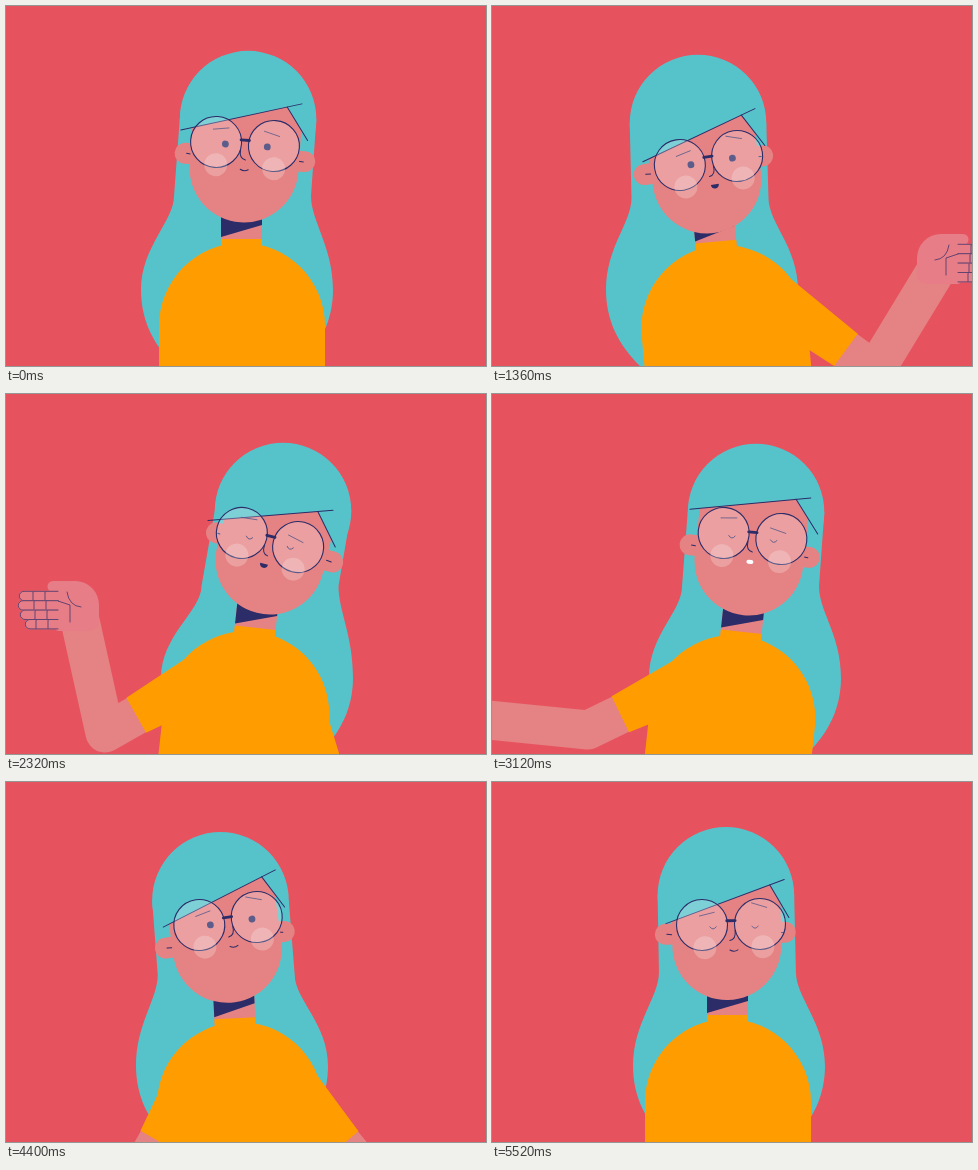
An HTML page with a canvas that plays this animation: 480x360 px, repeating every 5600 ms.

```html
<!DOCTYPE html>
<html lang="en">
<head>
<meta charset="utf-8">
<title>Talking character</title>
<style>
  html, body { margin: 0; width: 100%; height: 100%; overflow: hidden; background: #e6525e; }
  canvas { display: block; width: 480px; height: 360px; }
</style>
</head>
<body>
<canvas id="stage" width="480" height="360"></canvas>
<script>
const ctx = document.getElementById('stage').getContext('2d');
const LOOP = 5600, STEP = 80, RAD = Math.PI / 180;
const BG = '#e6525e', HAIR = '#56c3ca', SKIN = '#e58283', HAND = '#e77d86',
      SHIRT = '#ff9d00', NAVY = '#2b2c68';

// time, x, y, tilt of the glasses; then hair cap x, y and face x, y beside them; fringe; turn
const HEAD = [
  [0, 239, 138, 4, 1.3, -25, .7, 24, -9.5, .6],
  [560, 224, 144, -6, -4, -29, -4, 22, -6, .1],
  [1120, 221, 146, -7, -4.4, -31, -4.4, 21, -7, 0],
  [1360, 216.5, 154.5, -9, -4.5, -38.7, -4.4, 18, -9, 0],
  [1840, 258, 143, 9, 3, -27, 3, 22, -8, .8],
  [2320, 264, 146, 14, 5.6, -31.3, 4.8, 19.4, -4, 1],
  [3120, 260.5, 142, 6, 1, -24.2, -.9, 25.2, -20, .95],
  [3760, 222.5, 138, -8, -4.6, -20.9, -4.4, 27.7, -3, 0],
  [4400, 222, 139, -8, -4.6, -21.5, -4.4, 27, -3, 0],
  [4880, 240.5, 141, 0, -4, -28, -4.5, 22, -2, 0],
  [5520, 239, 142.5, -1, -4.6, -29.3, -4.5, 21, -2, 0]
];
// time, hair tips x, body tilt, body drop
const BODY = [
  [0, 231, 0, 0], [560, 223, -3, 0], [1120, 217, -4, 1], [1360, 210, -5.3, 2],
  [1840, 245, 5, 1], [2320, 251, 6.2, 0], [3120, 253, 6.2, 4], [3760, 232, -3, 3],
  [4400, 226, -3, 3], [4880, 237, 0, 0], [5520, 237, 0, 0]
];
// time, elbow x, y, wrist x, y
const RIGHT = [
  [0, 282, 400, 290, 480], [160, 345, 392, 400, 460], [320, 388, 362, 460, 300],
  [560, 378, 364, 398, 248], [1200, 378, 364, 398, 250], [1360, 383, 365, 445, 263],
  [1520, 372, 385, 460, 420], [1680, 300, 400, 310, 480], [1920, 300, 410, 310, 490],
  [2320, 330, 410, 335, 490], [3120, 305, 410, 310, 490], [3600, 361, 389, 372, 480],
  [4480, 360, 390, 371, 480], [4760, 282, 400, 290, 480]
];
const LEFT = [
  [0, 190, 400, 182, 480], [1600, 190, 400, 182, 480], [1760, 115, 380, 50, 430],
  [1920, 92, 345, 25, 275], [2080, 98, 340, 60, 226], [2320, 99, 339, 73, 222],
  [2880, 99, 338, 72, 222], [3120, 96, 336, -23, 324], [3280, 105, 350, 5, 410],
  [3600, 134, 390, 128, 480], [4480, 134, 390, 128, 480], [4760, 190, 400, 182, 480]
];

// Smooth interpolation through the keys without overshoot
function at(keys, t) {
  let i = 0;
  while (i < keys.length - 2 && t >= keys[i + 1][0]) i++;
  const a = keys[i], b = keys[i + 1], h = b[0] - a[0];
  const s = Math.min(1, (t - a[0]) / h), s2 = s * s, s3 = s2 * s;
  const slope = (k, c) => (keys[k + 1][c] - keys[k][c]) / (keys[k + 1][0] - keys[k][0]);
  const tangent = (k, c) => {
    if (k < 1 || k > keys.length - 2) return 0;
    const p = slope(k - 1, c), q = slope(k, c);
    return p * q <= 0 ? 0 : 2 * p * q / (p + q);
  };
  return a.slice(1).map((v, n) => {
    const c = n + 1;
    return (2 * s3 - 3 * s2 + 1) * v + (3 * s2 - 2 * s3) * b[c] +
      h * ((s3 - 2 * s2 + s) * tangent(i, c) + (s3 - s2) * tangent(i + 1, c));
  });
}

const rot = (x, y, deg) => {
  const c = Math.cos(deg * RAD), s = Math.sin(deg * RAD);
  return [x * c - y * s, x * s + y * c];
};

function path(points) {
  ctx.beginPath();
  points.forEach(p => ctx.lineTo(p[0], p[1]));
}
function poly(color, ...points) {
  path(points);
  ctx.fillStyle = color;
  ctx.fill();
}
function line(color, width, ...points) {
  path(points);
  ctx.strokeStyle = color;
  ctx.lineWidth = width;
  ctx.stroke();
}
function disc(color, x, y, r) {
  ctx.beginPath();
  ctx.arc(x, y, r, 0, 7);
  ctx.fillStyle = color;
  ctx.fill();
}
function curve(width, x0, y0, cx, cy, x1, y1) {
  ctx.beginPath();
  ctx.moveTo(x0, y0);
  ctx.quadraticCurveTo(cx, cy, x1, y1);
  ctx.strokeStyle = NAVY;
  ctx.lineWidth = width;
  ctx.stroke();
}

function drawHair(cx, cy, bx) {
  const px = (cx + bx) / 2, py = 190 + (cy - 113) / 2;
  disc(HAIR, cx, cy, 68.3);
  for (const s of [-1, 1]) {
    ctx.beginPath();
    ctx.moveTo(cx, cy);
    ctx.lineTo(cx + s * 68.3, cy);
    ctx.lineTo(px + s * 68.5, py);
    ctx.bezierCurveTo(px + s * 68.5, py + 25, bx + s * 96, 241, bx + s * 96, 284);
    ctx.bezierCurveTo(bx + s * 96, 315, bx + s * 83, 340, bx + s * 60, 362);
    ctx.lineTo(bx - s * 5, 362);
    ctx.lineTo(px - s * 5, py);
    ctx.fillStyle = HAIR;
    ctx.fill();
  }
}

// Fingers point to the left; side = 1 mirrors them
function drawHand(x, y, side) {
  ctx.save();
  ctx.translate(x, y);
  ctx.scale(-side, 1);
  ctx.beginPath();
  ctx.roundRect(-24, -35, 44, 50, [4, 24, 10, 4]);
  ctx.fillStyle = HAND;
  ctx.fill();
  line(HAND, 11, [-26, -29.5], [-4, -29.5]);
  [-55, -56, -54, -49].forEach((tip, i) => {
    const fy = -20 + i * 9.4;
    line(HAND, 10.5, [tip, fy], [-18, fy]);
    ctx.beginPath();
    ctx.moveTo(-21, fy - 4.7);
    ctx.lineTo(tip, fy - 4.7);
    ctx.arc(tip, fy, 4.7, -Math.PI / 2, Math.PI / 2, true);
    ctx.lineTo(-21, fy + 4.7);
    ctx.strokeStyle = NAVY;
    ctx.lineWidth = .7;
    ctx.stroke();
    for (const k of [-46, -34]) line(NAVY, .7, [k + i, fy - 4], [k + i, fy + 4]);
  });
  line(NAVY, .7, [-21, -15], [-9, -11], [-9, 6]);
  curve(.7, -12, -24, -10, -10, 2, -9);
  ctx.restore();
}

function drawArm([ex, ey, wx, wy], side, tilt, drop) {
  let [sx, sy] = rot(side * 40, -77, tilt);
  sx += 236;
  sy += 360 + drop;
  const len = Math.hypot(ex - sx, ey - sy);
  const dx = (ex - sx) / len, dy = (ey - sy) / len;
  const mx = ex - dx * 36, my = ey - dy * 36;
  line(SKIN, 39, [mx - dx * 4, my - dy * 4], [ex, ey], [wx, wy]);
  drawHand(wx, wy, side);
  poly(SHIRT, [sx - dy * 26, sy + dx * 26], [mx - dy * 20, my + dx * 20],
    [mx + dy * 20, my - dx * 20], [sx + dy * 26, sy - dx * 26]);
}

function withBody(tilt, drop, draw) {
  ctx.save();
  ctx.translate(236, 360 + drop);
  ctx.rotate(tilt * RAD);
  ctx.translate(-236, -360);
  draw();
  ctx.restore();
}
function drawNeck() {
  poly(SKIN, [215, 195], [256, 195], [256, 240], [215, 240]);
  poly(NAVY, [215, 195], [256, 195], [256, 219], [215, 231]);
}
function drawShirt() {
  poly(SHIRT, [215, 233], [256, 233], [256, 260], [215, 260]);
  ctx.beginPath();
  ctx.arc(236, 320, 83, Math.PI, 0);
  ctx.lineTo(319, 400);
  ctx.lineTo(153, 400);
  ctx.fill();
}

function drawMouth(x, kind) {
  if (kind === 0) curve(1, x - 4, 25.5, x, 28, x + 4, 25.5);
  else if (kind === 1) {
    ctx.beginPath();
    ctx.roundRect(x - 3.5, 24, 7, 4, 2);
    ctx.fillStyle = '#fff';
    ctx.fill();
  } else {
    ctx.beginPath();
    ctx.moveTo(x - 4, 24.5);
    ctx.lineTo(x + 4, 24.5);
    ctx.bezierCurveTo(x + 4, 30, x - 4, 30, x - 4, 24.5);
    ctx.fillStyle = NAVY;
    ctx.fill();
  }
}

function drawFace(fx, fy, fringe, u, closed, mouth) {
  const earY = fy * 1.6 - 25;
  for (const s of [-1, 1]) {
    const x = s * 60 + fx * 1.3;
    line(SKIN, 21, [x, earY], [fx + s * 40, earY]);
    line(NAVY, 1, [x - s * 4 - 2.5, earY], [x - s * 4 + 2.5, earY + .5]);
  }

  // Face shows below the fringe only
  const left = [-65, fringe], right = [54, -44];
  const corner = [39.5, fringe + (-44 - fringe) * 104.5 / 119];
  const side = [58 + 7 * u, -6 - 3 * u];
  ctx.save();
  path([left, corner, side, [110, 120], [-110, 120]]);
  ctx.clip();
  ctx.beginPath();
  ctx.arc(fx, fy, 54.5, 0, Math.PI);
  ctx.lineTo(fx - 54.5, -60);
  ctx.lineTo(fx + 54.5, -60);
  ctx.fillStyle = SKIN;
  ctx.fill();
  ctx.restore();
  line(NAVY, 1, left, right);
  line(NAVY, 1, corner, side);

  line(NAVY, .8, [-31.5 - 2 * u, -9 - 6 * u], [-16.5 - u, -12.5 - 4 * u]);
  line(NAVY, .8, [20.8 - 4 * u, -21.3 + 12 * u], [36 - 3.3 * u, -16.5 + 11 * u]);
  for (const s of [-1, 1]) {
    const x = 3 - 2.6 * u + s * 21;
    if (closed) curve(.9, x - 3.2, 2, x, 6.5, x + 3.2, 2);
    else disc(NAVY, x, 1.4, 3.4);
  }
  const n = Math.max(-1, Math.min(1, (.4 - u) * 5));
  curve(1, n * 4, 6, n * 5, 15, n * -1.5, 16);
  drawMouth(2.5 - 2.5 * u, mouth);

  for (const s of [-1, 1]) {
    disc('rgba(255,255,255,.23)', s * 29, 0, 25.5);
    ctx.strokeStyle = NAVY;
    ctx.lineWidth = 1.1;
    ctx.stroke();
    disc('rgba(255,255,255,.23)', 2.5 - 2 * u + s * 29, 22.7, 11.5);
  }
  line(NAVY, 2.8, [-4.2, -3.8], [4.2, -3.8]);
}

function draw(t) {
  const [x, y, tilt, capX, capY, fx, fy, fringe, turn] = at(HEAD, t);
  const [tips, lean, drop] = at(BODY, t);
  const [hx, hy] = rot(capX, capY, tilt);
  const closed = t >= 1760 && t < 3360 || t >= 4640;
  const mouth = t >= 480 && t < 3360 ? Math.floor(t / 160) % 3 : 0;

  ctx.lineCap = ctx.lineJoin = 'round';
  ctx.fillStyle = BG;
  ctx.fillRect(0, 0, 480, 360);
  drawHair(x + hx, y + hy, tips);
  withBody(lean, drop, drawNeck);
  drawArm(at(LEFT, t), -1, lean, drop);
  drawArm(at(RIGHT, t), 1, lean, drop);
  withBody(lean, drop, drawShirt);
  ctx.save();
  ctx.translate(x, y);
  ctx.rotate(tilt * RAD);
  drawFace(fx, fy, fringe, turn, closed, mouth);
  ctx.restore();
}

const start = performance.now();
function tick() {
  const t = (performance.now() - start) % LOOP;
  draw(Math.floor(t / STEP) * STEP);
  requestAnimationFrame(tick);
}
tick();
</script>
</body>
</html>
```
